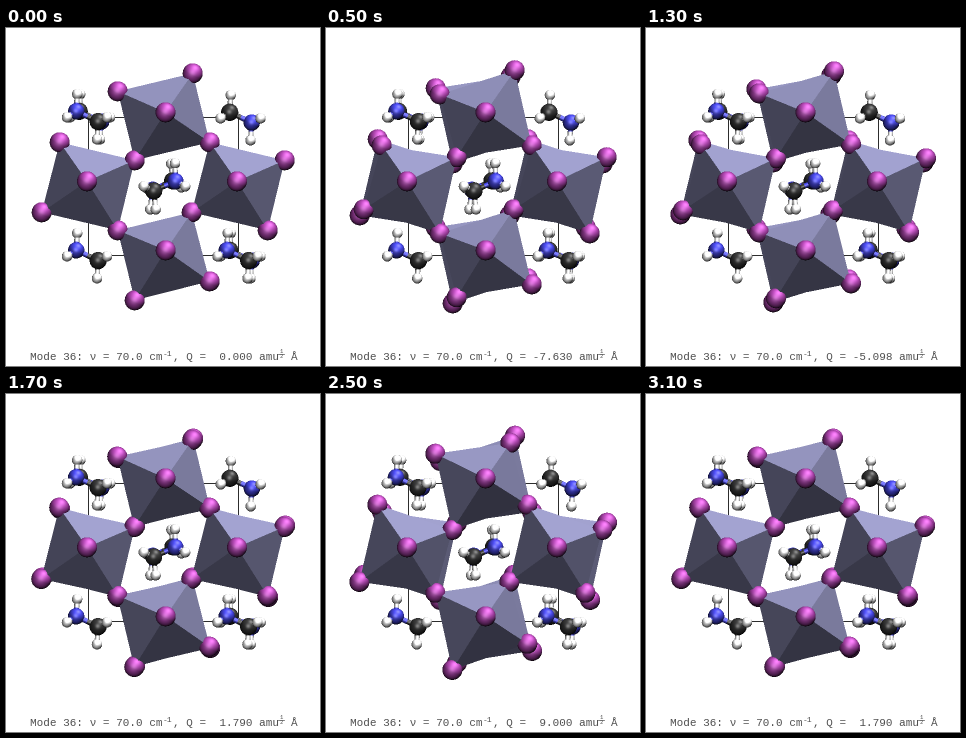
A matplotlib script that plays this animation: 314 px wide and 338 px high, repeating every 3200 ms.

```python
import numpy as np
import matplotlib.pyplot as plt
from matplotlib.animation import FuncAnimation

W, H, DPI = 314, 338, 64
SS = 2                       # supersampling
FRAMES, STEP = 32, 100
AMP = 9.1763
OX, OY = -0.3, 0.3           # sub-pixel placement of the whole model


def unit(v):
    v = np.asarray(v, float)
    return v / np.linalg.norm(v)


LIGHTS = [unit((-0.1, 0.1, 1)), unit((1, 2, 0.5))]
HALVES = [unit(l + (0, 0, 1)) for l in LIGHTS]

# kind: (radius, base colour, specular strength, shininess)
ATOMS = {
    "I": (10.0, (128, 50, 128), 0.20, 14),
    "C": (8.6, (40, 40, 40), 0.32, 26),
    "N": (8.2, (50, 50, 162), 0.26, 22),
    "H": (5.2, (188, 188, 188), 0.20, 16),
}
PB = (102, 102, 131)

# equatorial corners: x, y, sign of the vertical swing
CORNERS = [(112, 63, 1), (187, 45, -1), (204, 114, 1), (129, 132, -1),
           (54, 114, 1), (112, 202, 1), (36, 184, -1), (279, 132, -1),
           (262, 202, 1), (186, 184, -1), (204, 253, 1), (129, 272, -1)]
# apex and its ring of corners
OCTAHEDRA = [((159.8, 84), (0, 1, 2, 3)), ((81.3, 153), (4, 3, 5, 6)),
             ((231.3, 153), (2, 7, 8, 9)), ((160, 222), (5, 9, 10, 11))]
APEX_Z, LAYER_Z = 48, -97


def molecule(kinds, a, b, up, side_a, down, side_b):
    """Two heavy atoms with one in-plane and two mirrored hydrogens each."""
    atoms = [(kinds[0], *a, 0), (kinds[1], *b, 0)]
    bonds = [(0, 1)]
    for root, plane, side in ((0, up, side_a), (1, down, side_b)):
        for pos, z in ((plane, 0), (side, 11), (side, -11)):
            bonds.append((root, len(atoms)))
            atoms.append(("H", *pos, z))
    return atoms, bonds


def corner(kinds, x, y):
    return molecule(kinds, (x, y), (x + 22, y + 10.3), (x + 1, y - 17.2),
                    (x - 9.2, y + 6), (x + 20.8, y + 28), (x + 30.8, y + 6))


FRONT = [corner("NC", 70.5, 83), corner("NC", 70.5, 222),
         corner("NC", 221, 222),
         molecule("NC", (169.7, 153), (148, 162.5), (169.3, 135), (179.5, 158),
                  (150, 181), (138, 158))]
BACK = [corner("CN", 73.5, 83), corner("CN", 224, 84),
        corner("CN", 224, 222),
        molecule("CN", (167, 152.5), (147, 161.5), (165.5, 135.5), (175.5, 159),
                 (144.5, 181), (141, 160))]


def shade(n, base, spec=0.0, power=1, contrast=1.0):
    """Two-light shading; n has its components on the last axis."""
    diff = sum(np.clip(n @ l, 0, None) for l in LIGHTS) ** contrast
    col = diff[..., None] * np.array(base, float)
    if spec:
        gloss = sum(np.clip(n @ h, 0, None) ** power for h in HALVES)
        col = col + 255 * spec * gloss[..., None]
    return np.clip(col, 0, 255)


class Canvas:
    def __init__(self):
        self.rgb = np.full((H * SS, W * SS, 3), 255.0)
        self.z = np.full((H * SS, W * SS), -1e9)

    def window(self, x0, y0, x1, y1):
        c0, r0 = max(int(x0 * SS) - 1, 0), max(int(y0 * SS) - 1, 0)
        c1, r1 = min(int(x1 * SS) + 2, W * SS), min(int(y1 * SS) + 2, H * SS)
        xs = (np.arange(c0, c1) + 0.5) / SS
        ys = (np.arange(r0, r1) + 0.5) / SS
        x, y = np.meshgrid(xs, ys)
        return (slice(r0, r1), slice(c0, c1)), x, y

    def put(self, win, mask, z, col):
        mask = mask & (z > self.z[win])
        self.z[win][mask] = z[mask]
        self.rgb[win][mask] = np.broadcast_to(col, mask.shape + (3,))[mask]

    def sphere(self, kind, x, y, z):
        r, base, spec, power = ATOMS[kind]
        win, gx, gy = self.window(x - r, y - r, x + r, y + r)
        dx, dy = (gx - x) / r, (gy - y) / r
        q = 1 - dx * dx - dy * dy
        dz = np.sqrt(np.clip(q, 0, 1))
        n = np.stack([dx, -dy, dz], -1)
        self.put(win, q > 0, z + r * dz, shade(n, base, spec, power))

    def bond(self, p, q, kinds, r=2.6):
        p, q = np.array(p, float), np.array(q, float)
        lo, hi = np.minimum(p, q) - r, np.maximum(p, q) + r
        win, gx, gy = self.window(lo[0], lo[1], hi[0], hi[1])
        d = (q - p)[:2]
        size = np.hypot(*d) + 1e-9
        ux, uy = d / size
        along = ((gx - p[0]) * ux + (gy - p[1]) * uy) / size
        off = ((gy - p[1]) * ux - (gx - p[0]) * uy) / r
        h = np.sqrt(np.clip(1 - off * off, 0, 1))
        n = np.stack([-uy * off, -ux * off, h], -1)
        z = p[2] + (q[2] - p[2]) * along + r * h
        for kind, half in zip(kinds, (along < 0.5, along >= 0.5)):
            _, base, spec, power = ATOMS[kind]
            mask = half & (abs(off) < 1) & (along > 0) & (along < 1)
            self.put(win, mask, z, shade(n, base, spec, power))

    def triangle(self, a, b, c, base):
        a, b, c = (np.array(v, float) for v in (a, b, c))
        pts = np.array([a, b, c])
        win, gx, gy = self.window(*pts.min(0)[:2], *pts.max(0)[:2])
        n = np.cross(b - a, c - a)
        turn = np.sign(n[2])
        n = n * turn
        inside = np.ones(gx.shape, bool)
        for s, e in ((a, b), (b, c), (c, a)):
            side = (e[0] - s[0]) * (gy - s[1]) - (e[1] - s[1]) * (gx - s[0])
            inside &= side * turn >= 0
        z = a[2] - (n[0] * (gx - a[0]) + n[1] * (gy - a[1])) / n[2]
        col = shade(unit(n * (1, -1, 1)), base, contrast=1.12)
        self.put(win, inside, z, col)

    def box(self, x0, y0, x1, y1, z, col):
        win, gx, gy = self.window(x0, y0, x1, y1)
        mask = (gx > x0) & (gx < x1) & (gy > y0) & (gy < y1)
        self.put(win, mask, np.full(gx.shape, float(z)), np.array(col, float))

    def image(self):
        small = self.rgb.reshape(H, SS, W, SS, 3).mean((1, 3))
        return np.round(small).astype(np.uint8)


def draw_cell(cv):
    x0, x1, y0, y1, w = 82.5, 232.5, 89.5, 227.5, 0.5
    for y in (y0, y1):
        cv.box(x0 - w, y - w, x1 + w, y + w, -400, (45, 45, 45))
    for x in (x0, x1):
        cv.box(x - w, y0 - w, x + w, y1 + w, -400, (45, 45, 45))


def draw_layer(cv, q, z):
    ring = [(x + OX - 0.262 * q, y + OY - 0.4 * s * q, z) for x, y, s in CORNERS]
    for (ax, ay), loop in OCTAHEDRA:
        apex = (ax + OX, ay + OY, z + APEX_Z)
        for i, k in enumerate(loop):
            cv.triangle(ring[k], ring[loop[(i + 1) % 4]], apex, PB)
        cv.sphere("I", *apex)
    for p in ring:
        cv.sphere("I", *p)


def draw_molecules(cv, group, dx, z):
    for atoms, bonds in group:
        spots = [(x + OX + dx, y + OY, z + dz) for _, x, y, dz in atoms]
        for i, j in bonds:
            cv.bond(spots[i], spots[j], (atoms[i][0], atoms[j][0]))
        for atom, p in zip(atoms, spots):
            cv.sphere(atom[0], *p)


def mode_q(i):
    q = -AMP * np.sin(2 * np.pi * i / FRAMES)
    return 0.0 if abs(q) < 1e-6 else q


def render(q):
    cv = Canvas()
    draw_cell(cv)
    draw_layer(cv, -q, LAYER_Z)
    draw_layer(cv, q, 0)
    draw_molecules(cv, BACK, 0.1 * q, -60)
    draw_molecules(cv, FRONT, -0.03 * q, 20)
    return cv.image()


fig = plt.figure(figsize=(W / DPI, H / DPI), dpi=DPI, facecolor="white")
ax = fig.add_axes([0, 0, 1, 1])
ax.axis("off")
scenes = [render(mode_q(i)) for i in range(FRAMES)]
picture = ax.imshow(scenes[0], extent=(0, W, H, 0), interpolation="nearest",
                    aspect="auto")
ax.set_xlim(0, W)
ax.set_ylim(H, 0)
INK = "#505050"


def label(x, y, text, px=11, ha="left"):
    return ax.text(x, y, text, fontsize=px * 72 / DPI, family="Liberation Mono",
                   color=INK, ha=ha, va="baseline")


label(24, 332, "Mode 36: ν = 70.0 cm")
label(156.5, 328, "-1", 8)
value = label(167, 332, "")
label(275, 325, "1", 5.5, "center")
label(275, 330.5, "2", 5.5, "center")
ax.plot([272, 278], [326, 326], color=INK, lw=0.7 * 72 / DPI)
label(284.2, 332, "Å")


def update(i):
    picture.set_data(scenes[i])
    value.set_text(f", Q = {mode_q(i):6.3f} amu")
    return picture, value


anim = FuncAnimation(fig, update, frames=FRAMES, interval=STEP, repeat=True,
                     repeat_delay=0, blit=False)
plt.show()
```
